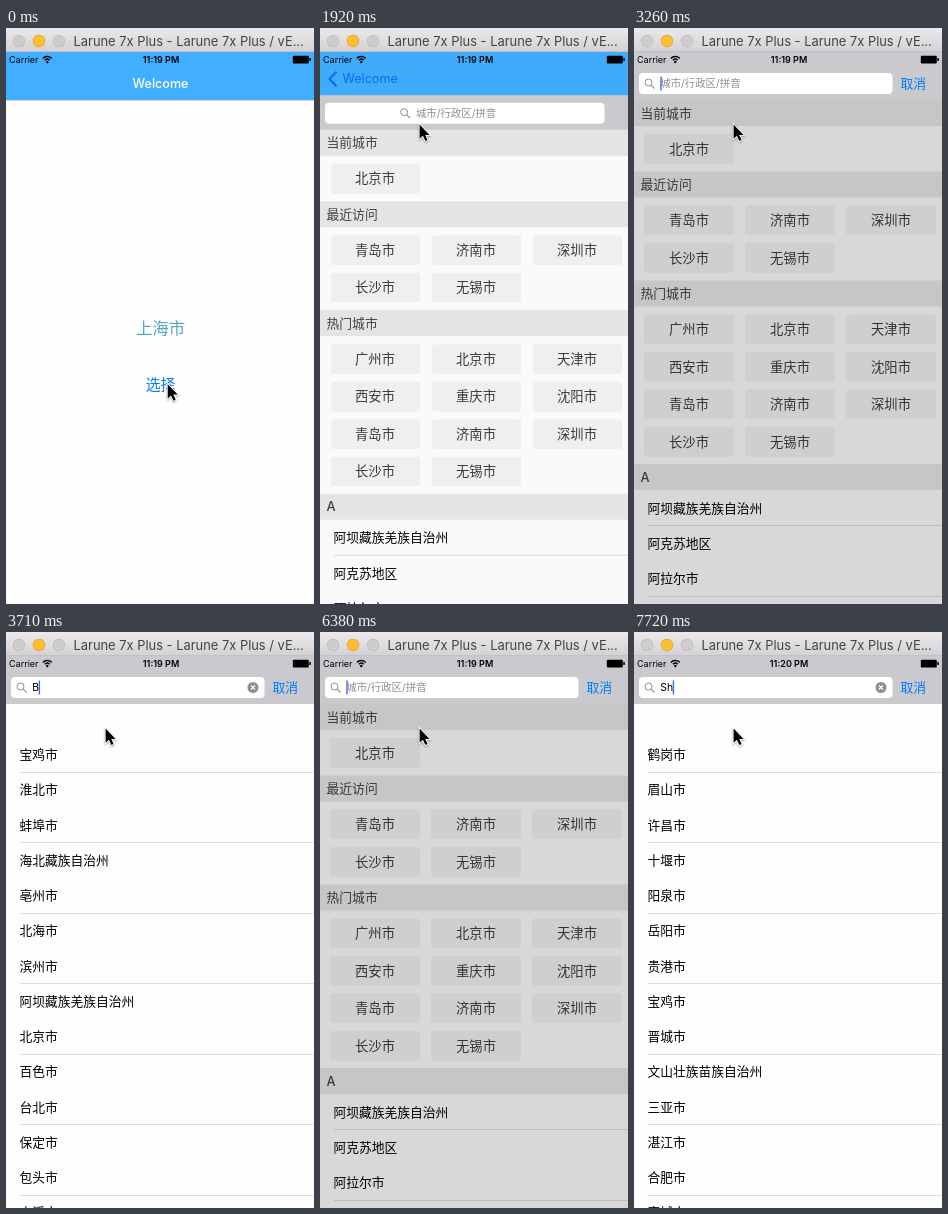
These frames come from a looping animation (308x576 px, 8 s). An HTML page with a canvas:

```html
<!DOCTYPE html>
<html lang="zh-CN">
<head>
<meta charset="utf-8">
<style>
html, body { margin: 0; width: 100%; height: 100%; overflow: hidden; background: #fefefe; }
canvas { display: block; width: 308px; height: 576px; }
</style>
</head>
<body>
<canvas></canvas>
<script>
const W = 308, H = 576, LOOP = 8000, TICK = 148.4;
const canvas = document.querySelector('canvas');
const c = canvas.getContext('2d');
const dpr = window.devicePixelRatio || 1;
canvas.width = W * dpr;
canvas.height = H * dpr;

const BLUE = '#007aff', BAR = '#c9c9ce', PAPER = '#fefefe', GREY = '#8e8e93', RULE = '#dedede';
const list = s => s.split(' ');
const recent = list('青岛市 济南市 深圳市 长沙市 无锡市');
const sections = [
  ['当前城市', 105, ['北京市']],
  ['最近访问', 176.5, recent],
  ['热门城市', 285.5, [...list('广州市 北京市 天津市 西安市 重庆市 沈阳市'), ...recent]],
  ['A', 469, []]
];
const provinces = list('阿坝藏族羌族自治州 阿克苏地区 阿拉尔市');
const be = list('淮北市 海北藏族自治州 北海市 北京市 台北市 呼伦贝尔市 本溪市 台北县');
const all = list('鹤岗市 眉山市 许昌市 十堰市 阳泉市 岳阳市 贵港市 宝鸡市 晋城市 文山壮族苗族自治州 三亚市 湛江市 合肥市 宣城市');
const results = {
  B: list('宝鸡市 淮北市 蚌埠市 海北藏族自治州 亳州市 北海市 滨州市 阿坝藏族羌族自治州 北京市 百色市 台北市 保定市 包头市 本溪市'),
  Be: be,
  Bei: be.filter(name => name !== '本溪市'),
  S: all,
  Sh: all
};

// Values that change at a given tick and hold until the next entry
const typing = [[0, ''], [25, 'B'], [35, 'Be'], [37, 'Bei'], [40, 'Be'], [42, 'B'], [43, ''], [47, 'S'], [52, 'Sh']];
const blink = [[0, 0], [16, 1], [19, .5], [20, 0], [22, 1], [29, .5], [30, 0], [32, .5], [33, 1], [51, .5], [52, 1]];
const push = [[0, 0], [3, .6], [4, 1]];
const focus = [[0, 0], [13, .1], [14, .64], [15, .95], [16, 1]];
const at = (track, n) => track.findLast(k => k[0] <= n)[1];
const mix = (a, b, k) => a + (b - a) * k;

function text(s, x, y, size, color, { align = 'left', weight = 400, alpha = 1 } = {}) {
  c.font = `${weight} ${size}px Inter, "Noto Sans CJK SC", "Noto Sans CJK", sans-serif`;
  c.textAlign = align;
  c.fillStyle = color;
  c.globalAlpha = alpha;
  c.fillText(s, x, y + size * .37);
  c.globalAlpha = 1;
}
function rect(x, y, w, h, color, r = 0) {
  c.fillStyle = color;
  c.beginPath();
  c.roundRect(x, y, w, h, r);
  c.fill();
}
function disc(x, y, r, color) {
  c.fillStyle = color;
  c.beginPath();
  c.arc(x, y, r, 0, 7);
  c.fill();
}
function line(points, color, width) {
  c.strokeStyle = color;
  c.lineWidth = width;
  c.beginPath();
  points.forEach(p => c.lineTo(...p));
  c.stroke();
}
function shifted(x, y, draw) {
  c.save();
  c.translate(x, y);
  draw();
  c.restore();
}

function welcomePage() {
  rect(0, 72, W, H, PAPER);
  text('上海市', 154.5, 300, 16.4, '#4fa9bc', { align: 'center', weight: 300 });
  text('选择', 154.5, 357, 14.8, BLUE, { align: 'center' });
}

function cityPage(p) {
  const left = p === 1 ? 10 : 11;
  rect(0, 72, W, H, PAPER);
  for (const [title, y, cities] of sections) {
    rect(0, y, W, 26, '#e8e8e8');
    text(title, 6.5, y + 13, 12.8, '#404040', { weight: 500 });
    cities.forEach((city, i) => {
      const x = left + i % 3 * 101, top = y + 34 + Math.floor(i / 3) * 37.5;
      rect(x, top, 100 - left, 29.8, '#f3f3f3', 3);
      text(city, 55 + i % 3 * 101, top + 14.8, 13.3, '#3a3a3a', { align: 'center' });
    });
  }
  provinces.forEach((name, i) => text(name, 13.5, 513 + i * 35.2, 12.75, '#000'));
  for (const y of [530, 601]) rect(14, y, (p ? W : 298) - 14, 1, RULE);
  if (p) return;
  [...'⊙♡⊖ABCDEFGHJKLMNPQRSTWXYZ'].forEach((s, i) =>
    text(s, 304, 200 + i * 10.33, 7.6, '#858585', { align: 'center' }));
}

function resultPage(names) {
  rect(0, 72, W, H, PAPER);
  names.forEach((name, i) => text(name, 13.5, 122.5 + i * 35.25, 12.75, '#000'));
  for (let y = 140; y < H; y += 70.45) rect(14, Math.round(y), W, 1, RULE);
}

function searchBar(p, query, caret) {
  const q = 1 - (1 - p) ** 2.4;
  const top = 72 - 48 * p, y = 88.5 - 33 * p;
  const x = mix(116, 26.3, q);
  rect(0, top, W, 105 - 33 * p - top, BAR);
  rect(5, y - 10.5, mix(287, 253.5, q), 21, '#fff', 4);
  c.strokeStyle = GREY;
  c.lineWidth = 1;
  c.beginPath();
  c.arc(x - 11.8, y - 1, 3.5, 0, 7);
  c.stroke();
  line([[x - 9.2, y + 1.6], [x - 5.8, y + 5]], GREY, 1.1);
  text(query || '城市/行政区/拼音', x, y, 10.4, query ? '#000' : GREY);
  if (query) {
    disc(247, y, 5.5, GREY);
    line([[245, y - 2], [249, y + 2]], '#fff', 1.1);
    line([[249, y - 2], [245, y + 2]], '#fff', 1.1);
  }
  c.globalAlpha = caret;
  rect(x + (query ? c.measureText(query).width - .4 : 0), y - 7, 1.4, 14, '#3f6df0');
  c.globalAlpha = 1;
  text('取消', mix(300, 266.5, q), y, 12.8, BLUE, { alpha: p ** 5 });
}

function navBar(k, p) {
  rect(0, 24, W, 48 * (1 - p), '#42aeff');
  shifted(0, -48 * p, () => {
    rect(0, 72, W, .6, '#b2b2b2');
    text('Welcome', mix(154.5, 49, k), 55.6, 12.6, '#fff', { align: 'center', weight: 500, alpha: 1 - k });
    text('Welcome', mix(127, 22.5, k), 55.6, 12.6, '#0070f5', { alpha: k });
    c.globalAlpha = k;
    line([[16.5, 48.5], [9.5, 55.7], [16.5, 63]], '#0070f5', 2);
    c.globalAlpha = 1;
  });
}

function statusBar(minute) {
  text('Carrier', 3, 32, 9, '#000');
  text(`11:${minute} PM`, 155, 31.8, 9, '#000', { align: 'center', weight: 600 });
  c.strokeStyle = '#000';
  c.lineWidth = 1.3;
  for (const r of [3.3, 6]) {
    c.beginPath();
    c.arc(41.3, 34.5, r, -2.4, -.74);
    c.stroke();
  }
  disc(41.3, 34, 1.2, '#000');
  rect(286.8, 27.8, 16, 7.6, '#000', 1);
  rect(303.3, 30, 1.5, 3, '#000', .5);
}

function titleBar() {
  const g = c.createLinearGradient(0, 0, 0, 24);
  g.addColorStop(0, '#ebe9eb');
  g.addColorStop(1, '#d3d1d3');
  rect(0, 0, W, 24, g);
  rect(0, 23.5, W, .5, '#b4b2b4');
  ['#cecccd', '#fdbe30', '#cecccd'].forEach((color, i) => {
    disc(13 + i * 20, 13, 6.2, i === 1 ? '#e0a32a' : '#bcbabc');
    disc(13 + i * 20, 13, 5.6, color);
  });
  text('Larune 7x Plus - Larune 7x Plus / vE...', 67.5, 13.2, 12.9, '#454345');
}

function cursor(n) {
  let x = 161.7, y = 356.2;
  if (n >= 1) [x, y] = [155, 361];
  if (n >= 7) {
    const k = 1 - (1 - Math.min(1, (n - 7) / 4)) ** 2;
    [x, y] = [mix(136, 99.6, k), mix(150.6, 96.5, k)];
  }
  shifted(x, y, () => {
    const arrow = new Path2D('M0 0V14.2L3.3 11.2L5.8 16.6L8 15.6L5.6 10.4H10Z');
    c.shadowColor = 'rgba(0,0,0,.35)';
    c.shadowBlur = 2 * dpr;
    c.shadowOffsetY = dpr;
    c.strokeStyle = '#fff';
    c.lineWidth = 1.8;
    c.stroke(arrow);
    c.shadowColor = 'transparent';
    c.fillStyle = '#000';
    c.fill(arrow);
  });
}

function draw(now) {
  // The screen refreshes in steps of one tick
  const n = Math.floor((now % LOOP + 15) / TICK);
  const k = at(push, n), p = at(focus, n), query = at(typing, n);
  c.setTransform(dpr, 0, 0, dpr, 0, 0);
  if (k < 1) shifted(-90 * k, 0, welcomePage);
  shifted(W * (1 - k), 0, () => {
    if (k === 0) return;
    if (query) resultPage(results[query]);
    else shifted(0, -33 * p, () => cityPage(p));
  });
  navBar(k, p);
  if (!query) rect(0, 24, W, H, `rgba(0,0,0,${.15 * p})`);
  if (k > 0) shifted(W * (1 - k), 0, () => searchBar(p, query, at(blink, n)));
  statusBar(n < 45 ? 19 : 20);
  titleBar();
  cursor(n);
  requestAnimationFrame(draw);
}
requestAnimationFrame(draw);
</script>
</body>
</html>
```
